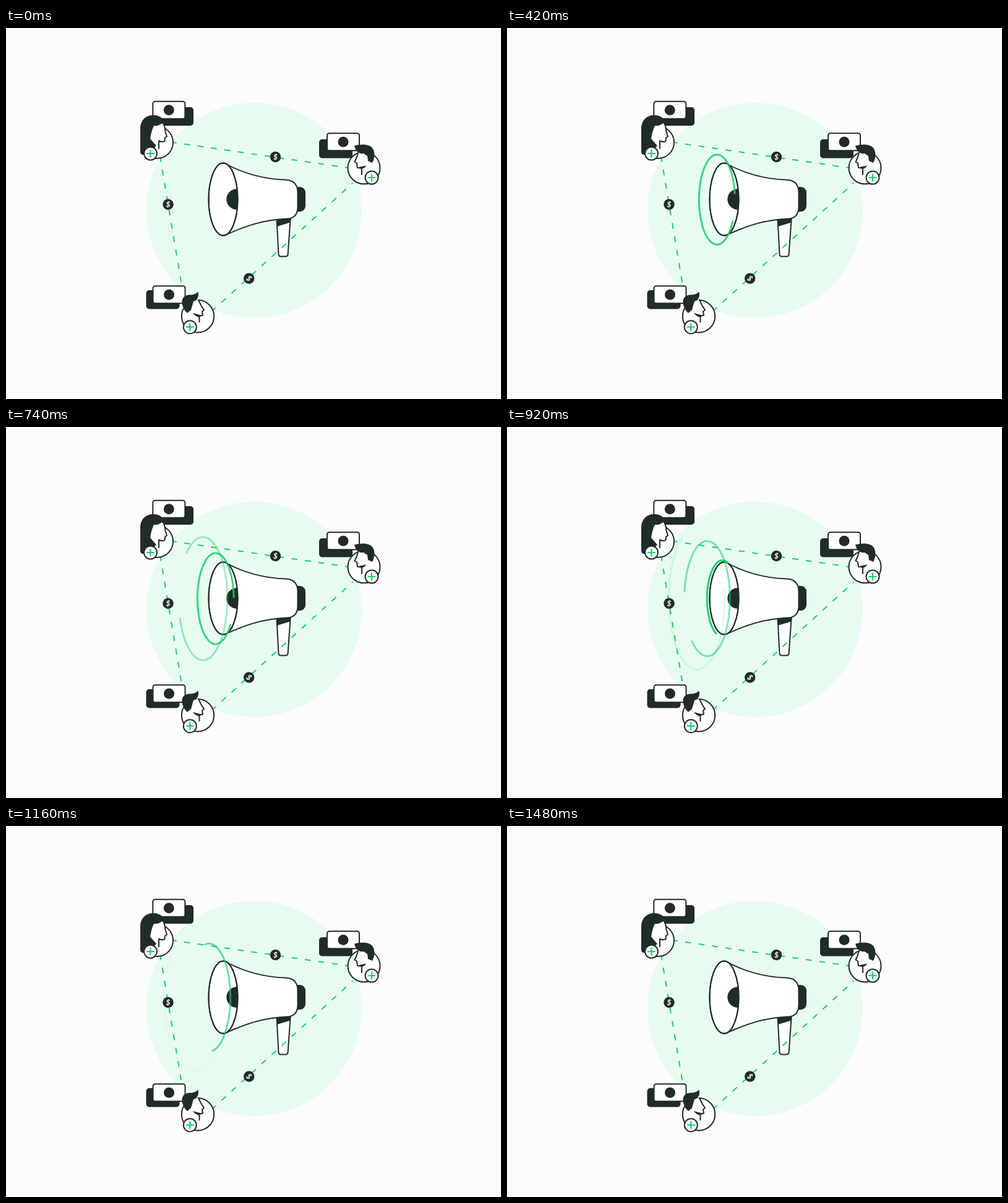
Recreate the animation shown at these times as an HTML page. Size 800 px wide and 600 px high, loop 1.76 s.

```html
<!DOCTYPE html>
<html lang="en">
<head>
<meta charset="utf-8">
<title>Megaphone network</title>
<style>
  html, body { margin: 0; width: 100%; height: 100%; overflow: hidden; background: #fcfcfc; }
  svg { display: block; width: 100vw; height: 100vh; }
  .ink { fill: #212b28; }
  .skin { fill: #fff; }
  .line { fill: #fff; stroke: #212b28; stroke-width: 2; stroke-linejoin: round; stroke-linecap: round; }
  .bare { fill: none; }
  .glass { fill: #fffc; }
  .green { fill: none; stroke: #1bcf6c; stroke-width: 2.2; stroke-linecap: round; }
  .dash { stroke-width: 2; stroke-dasharray: 8 13.9; stroke-dashoffset: 3; }
  .wave { stroke-width: 3; }
  text { font: 700 12px Lato, sans-serif; fill: #fff; text-anchor: middle; }
</style>
</head>
<body>
<svg viewBox="0 0 800 600">
  <defs>
    <g id="card"><rect class="line" x="-26" y="-14" width="52" height="28" rx="3.5"/><circle class="ink" r="8.5"/></g>
    <g id="badge"><circle class="line" r="10.5"/><path class="green" d="M-5.5 0H5.5M0-5.5V5.5"/></g>
    <g id="coin"><circle class="ink" r="8.7"/><text y="4.2">$</text></g>
    <clipPath id="mouth"><ellipse cx="351" cy="277" rx="23.5" ry="58.5"/></clipPath>
  </defs>

  <rect width="800" height="600" fill="#fcfcfc"/>
  <circle cx="401" cy="295" r="174" fill="#e7fbf1"/>

  <g id="megaphone">
    <rect class="ink" x="460" y="257" width="24" height="40" rx="9"/>
    <path class="line" d="M437.5 309L440.5 366Q440.7 369.5 444 369.5H452Q455.3 369.5 455.6 366L459.7 308Z"/>
    <path class="ink" d="M437 308L460 307L459.3 314.5L438 321Z"/>
    <path class="line" d="M353 218.500C381 234 415 244.500 452 245.500Q471.500 246.500 471.500 266V290Q471 308 454 308.500C415 310 385 321 353 335.500Z"/>
    <ellipse class="line" cx="351" cy="277" rx="23.5" ry="58.5"/>
    <circle class="ink" cx="373" cy="277" r="16.7" clip-path="url(#mouth)"/>
    <ellipse class="line bare" cx="351" cy="277" rx="23.5" ry="58.5"/>
  </g>

  <path class="green dash" d="M270 185L552 226"/>
  <path class="green dash" d="M249.500 211L284 416"/>
  <path class="green dash" d="M335 456L560 251"/>

  <g id="waves"></g>

  <use href="#coin" transform="translate(435.500 208.500) rotate(8)"/>
  <use href="#coin" transform="translate(262 285.300) rotate(8)"/>
  <use href="#coin" transform="translate(392.700 405) rotate(48)"/>

  <g id="woman">
    <rect class="ink" x="251" y="128" width="52" height="30" rx="5"/>
    <use href="#card" x="263.300" y="132.800"/>
    <circle class="line glass" cx="244" cy="185" r="26"/>
    <path class="ink" d="M217 200V163C217 149 226 141 238 141C247 141 254 145 257 154L246 178V186C240 195 230 204 222 205Q217 205 217 200Z"/>
    <path class="skin" d="M239 158Q247 159 252 154L257 159L258 169L260 176L257 178V183L248 184V196L239 186L233 179Q235 166 239 158Z"/>
    <path class="line bare" d="M255 156Q257.500 162 257.500 168L260 175.500L257 177.500L256.500 183Q252 185 247 182.500V195"/>
    <use href="#badge" x="233.500" y="203"/>
  </g>

  <g id="manRight">
    <rect class="ink" x="506" y="180" width="54" height="30.500" rx="5"/>
    <use href="#card" x="545" y="184.300"/>
    <circle class="line glass" cx="578.500" cy="226.300" r="26"/>
    <path class="skin" d="M569 201L565 209L563 217L567 220L568 227L575 227L582 225L591 214L587 201Z"/>
    <path class="line bare" d="M569 202L566.500 210L563.500 216.500L567 218.500L568 226L575 226.500V237"/>
    <path class="ink" d="M570 225L582 222.500Q580 227 574 228Z"/>
    <path class="ink" d="M563 190.500C572 188 586 187 592 194C597 200 596 211 592 218L585 215L584 207L578 203C570 204 565 199 563 190.500Z"/>
    <use href="#badge" x="591" y="242"/>
  </g>

  <g id="manLeft">
    <rect class="ink" x="226.500" y="424" width="54" height="30.500" rx="5"/>
    <use href="#card" x="263.500" y="431.200"/>
    <circle class="line" cx="310" cy="466.300" r="26.200"/>
    <path class="skin" d="M297 444L311 439L316 449L320 456L318 464L312 467L304 464L295 457Z"/>
    <path class="line bare" d="M311 440L315.500 449L320 456L317 458.500L318 464.500L312.500 466V475.500"/>
    <path class="ink" d="M302 461L315 464.500L312 468Q305 466 302 461Z"/>
    <path class="ink" d="M310.500 426.500C312 435 310 439 303 442L301 449L299 456L293 461C287 456 284 448 284.500 441C286 433 293 431 300 431.500C305 431 308 429 310.500 426.500Z"/>
    <use href="#badge" x="297.300" y="483.700"/>
  </g>
</svg>

<script>
  const LOOP = 1760, STEP = 20;

  // gap: [ms since start, gap start, gap end], degrees clockwise from the right
  const rings = [
    { start: 250, life: 740, gap: [[0, -90, -90], [170, -8, 29], [330, 61, 148], [490, 161, 228], [670, 238, 354], [740, 270, 405]] },
    { start: 600, life: 575, gap: [[0, -90, -82], [140, -2, 35], [320, 132, 187], [575, 270, 390]] },
    { start: 890, life: 580, gap: [[0, -90, 96], [580, 275, 448]] }
  ];

  const mix = (a, b, k) => a + (b - a) * k;

  for (const ring of rings) {
    ring.path = document.createElementNS("http://www.w3.org/2000/svg", "path");
    ring.path.setAttribute("class", "green wave");
    document.getElementById("waves").append(ring.path);
  }

  function gapAt(gap, ms) {
    let i = 1;
    while (i < gap.length - 1 && ms > gap[i][0]) i++;
    const a = gap[i - 1], b = gap[i];
    const k = (ms - a[0]) / (b[0] - a[0]);
    return [mix(a[1], b[1], k), mix(a[2], b[2], k)];
  }

  function drawRing({ start, life, gap, path }, time) {
    const p = (time - start) / life;
    if (p < 0 || p >= 1) {
      path.style.display = "none";
      return;
    }
    const cx = mix(350.5, 302, p), cy = 277.5;
    const rx = mix(23.5, 47.5, p), ry = mix(58.5, 120.5, p);
    const [from, to] = gapAt(gap, time - start);
    const point = deg => {
      const a = deg * Math.PI / 180;
      return `${cx + rx * Math.cos(a)} ${cy + ry * Math.sin(a)}`;
    };
    const end = from + 360, half = (to + end) / 2;
    const arc = `A${rx} ${ry} 0 0 1 `;
    path.setAttribute("d", `M${point(to)}${arc}${point(half)}${arc}${point(end)}`);
    path.style.display = "";
    path.style.opacity = 1 - p ** 1.3;
  }

  const origin = performance.now();
  function frame() {
    const elapsed = (performance.now() - origin) % LOOP;
    const time = Math.floor(elapsed / STEP) * STEP;
    rings.forEach(ring => drawRing(ring, time));
    requestAnimationFrame(frame);
  }
  frame();
</script>
</body>
</html>
```
